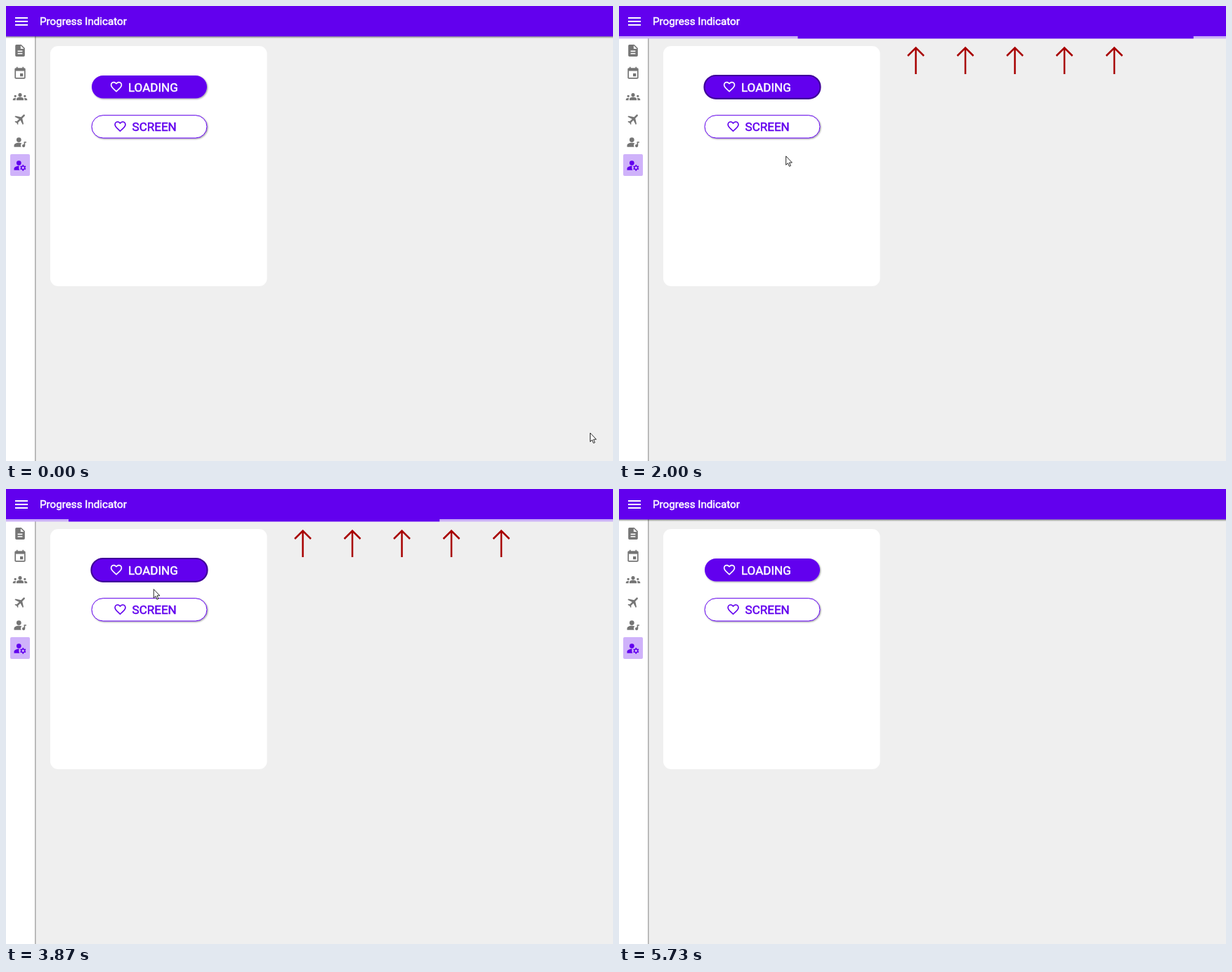
Recreate the animation shown at these times as an HTML page. Size 864x648 px, loop 5.87 s.

```html
<!DOCTYPE html>
<html lang="en">
<head>
<meta charset="utf-8">
<title>Progress Indicator</title>
<style>
  html, body { margin: 0; width: 100%; height: 100%; overflow: hidden; background: #efefef; }
  svg { display: block; width: 864px; height: 648px; }
  text { font-family: Roboto, sans-serif; stroke-width: .5px; }
</style>
</head>
<body>
<svg viewBox="0 0 864 648" xmlns="http://www.w3.org/2000/svg">
  <defs>
    <linearGradient id="down" x2="0" y2="1">
      <stop offset="0" stop-color="#000" stop-opacity=".42"/>
      <stop offset="1" stop-color="#000" stop-opacity="0"/>
    </linearGradient>
    <linearGradient id="right">
      <stop offset="0" stop-color="#999"/>
      <stop offset="1" stop-color="#ddd"/>
    </linearGradient>
    <filter id="shadow" x="-10%" y="-20%" width="120%" height="150%">
      <feDropShadow dx="1" dy="1" stdDeviation=".8" flood-color="#000" flood-opacity=".4"/>
    </filter>
    <path id="heart" d="M16.5 3c-1.74 0-3.41.81-4.5 2.09C10.91 3.81 9.24 3 7.5 3 4.42 3 2 5.42 2 8.5c0 3.78 3.4 6.86 8.55 11.54L12 21.35l1.45-1.32C18.6 15.36 22 12.28 22 8.5 22 5.42 19.58 3 16.5 3zm-4.4 15.55l-.1.1-.1-.1C7.14 14.24 4 11.39 4 8.5 4 6.5 5.5 5 7.5 5c1.54 0 3.04.99 3.57 2.36h1.87C13.46 5.99 14.96 5 16.5 5c2 0 3.5 1.5 3.5 3.5 0 2.89-3.14 5.74-7.9 10.05z"/>
    <path id="redArrow" d="M0 97V59.500M-11.500 71L0 59.500L11.500 71"/>
  </defs>

  <rect width="864" height="648" fill="#efefef"/>
  <rect x="63" y="57" width="308.500" height="342" rx="11" fill="#fff"/>

  <rect width="41" height="648" fill="#fff"/>
  <rect x="41" width="2" height="648" fill="url(#right)"/>
  <rect x="6" y="211" width="28" height="31" rx="2" fill="#cfb2fa"/>
  <g id="menu" fill="#757575" fill-rule="evenodd">
    <path transform="translate(9.800 53.300) scale(.85)" d="M14 2H6c-1.100 0-1.990.9-1.990 2L4 20c0 1.100.89 2 1.990 2H18c1.100 0 2-.9 2-2V8l-6-6zm2 16H8v-2h8v2zm0-4H8v-2h8v2zm-3-5V3.500L18.500 9H13z"/>
    <path transform="translate(9.800 85.800) scale(.85)" d="M17 12h-5v5h5v-5zM16 1v2H8V1H6v2H5c-1.110 0-1.990.9-1.990 2L3 19c0 1.100.89 2 2 2h14c1.100 0 2-.9 2-2V5c0-1.100-.9-2-2-2h-1V1h-2zm3 18H5V8h14v11z"/>
    <path transform="translate(9.800 119) scale(.85)" d="M12 12.750c1.630 0 3.070.39 4.240.9 1.080.48 1.760 1.560 1.760 2.730V18H6v-1.610c0-1.180.68-2.260 1.760-2.730 1.170-.52 2.610-.91 4.240-.91zM4 13a2 2 0 1 0 0-4 2 2 0 0 0 0 4zm1.130 1.100c-.37-.06-.74-.1-1.130-.1-.99 0-1.930.21-2.780.58C.48 14.900 0 15.620 0 16.430V18h4.500v-1.610c0-.83.23-1.610.63-2.290zM20 13a2 2 0 1 0 0-4 2 2 0 0 0 0 4zm4 3.430c0-.81-.48-1.530-1.220-1.850-.85-.37-1.790-.58-2.780-.58-.39 0-.76.04-1.130.1.4.68.63 1.460.63 2.290V18H24v-1.570zM12 6a3 3 0 1 1 0 6 3 3 0 0 1 0-6z"/>
    <path transform="translate(20.500 161) rotate(45) scale(.85) translate(-11.500 -12)" d="M21 16v-2l-8-5V3.500c0-.83-.67-1.500-1.500-1.500S10 2.670 10 3.500V9l-8 5v2l8-2.500V19l-2 1.500V22l3.500-1 3.500 1v-1.500L13 19v-5.500l8 2.500z"/>
    <path transform="translate(9.800 183.800) scale(.85)" d="M10 4a4 4 0 1 1 0 8 4 4 0 0 1 0-8zM2 20v-2.800c0-1.100.6-2.200 1.600-2.700 3.300-1.700 7.700-2 11.200-.8a5 5 0 0 0-.8 6.300zM18.500 11h4v2h-2v5a2.500 2.500 0 1 1-2-2.450z"/>
    <path fill="#6200ee" transform="translate(9.800 216.800) scale(.85)" d="M10 4a4 4 0 1 1 0 8 4 4 0 0 1 0-8zM10.670 13.020C10.450 13.010 10.230 13 10 13c-2.420 0-4.680.67-6.610 1.820-.88.52-1.390 1.500-1.390 2.530V20h9.260c-.79-1.130-1.260-2.510-1.260-4 0-1.070.25-2.070.67-2.980zM20.750 16c0-.22-.03-.42-.06-.63l1.140-1.010-1-1.730-1.450.49c-.32-.27-.68-.48-1.080-.63L18 11h-2l-.3 1.490c-.4.15-.76.36-1.080.63l-1.450-.49-1 1.730 1.140 1.010c-.03.21-.06.41-.06.63s.03.42.06.63l-1.140 1.010 1 1.730 1.450-.49c.32.27.68.48 1.080.63L16 21h2l.3-1.490c.4-.15.76-.36 1.080-.63l1.450.49 1-1.730-1.140-1.010c.03-.21.06-.41.06-.63zM17 18a2 2 0 1 1 0-4 2 2 0 0 1 0 4z"/>
  </g>

  <rect y="43" width="864" height="3.500" fill="url(#down)"/>
  <rect width="864" height="43.300" fill="#6200ee"/>
  <path transform="translate(10 10)" fill="#fff" d="M3 16h18v2H3zM3 11h18v2H3zM3 6h18v2H3z"/>
  <text x="48" y="27.300" font-size="15.200" fill="#fff" stroke="#fff">Progress Indicator</text>

  <g id="loading">
    <rect id="face" x="122" y="99" width="164" height="32.500" rx="16.250" fill="#6200ee"/>
    <use href="#heart" transform="translate(147.200 105.300) scale(.82)" fill="#fff"/>
    <text x="174" y="121.700" font-size="17" fill="#fff" stroke="#fff">LOADING</text>
  </g>
  <rect id="ring" y="99" x="121.500" width="165" height="32.800" rx="16.400" fill="none"/>

  <rect x="122" y="155.700" width="164" height="32.300" rx="16.150" fill="#fff" stroke="#6200ee" filter="url(#shadow)"/>
  <use href="#heart" transform="translate(152.700 161.700) scale(.82)" fill="#6200ee"/>
  <text x="179.600" y="177.900" font-size="17" fill="#6200ee" stroke="#6200ee">SCREEN</text>

  <g id="progress">
    <rect y="43" width="864" height="3.400" fill="#cbb0f7"/>
    <rect id="first" y="43" height="3.400" fill="#6200ee"/>
    <rect id="second" y="43" height="3.400" fill="#6200ee"/>
    <g fill="none" stroke="#a80000" stroke-width="2.500">
      <use href="#redArrow" x="422.500"/>
      <use href="#redArrow" x="493"/>
      <use href="#redArrow" x="563.500"/>
      <use href="#redArrow" x="634"/>
      <use href="#redArrow" x="705"/>
    </g>
  </g>

  <g id="cursor" fill="#fff" stroke="#111" stroke-linejoin="round">
    <path id="pointer" stroke-width=".9" d="M.5 0V12.500L3.300 9.900L5.200 14.500L7.200 13.700L5.300 9.200H9.200Z"/>
    <path id="hand" stroke-width="1" d="M-1.600 11.500V1.300C-1.600-.4 1.400-.4 1.400 1.300V7C1.600 5.600 4 5.800 4 7.300C4.200 6.300 6.400 6.400 6.500 7.900C7 7.200 8.800 7.500 8.800 9V13C8.800 15.500 7.400 16.500 7.200 19H-.6C-.9 16.500-4.800 12.600-5 10.600C-5 9-3 9-1.600 11.500Z"/>
  </g>
</svg>
<script>
const LOOP = 5870, FPS = 15, WIDTH = 864;
const CYCLE = 2000, CYCLE_START = 1470;
const $ = id => document.getElementById(id);
const clamp = v => Math.min(1, Math.max(0, v));
const within = (t, from, to) => t >= from && t < to;
const show = (id, on) => $(id).setAttribute('display', on ? 'inline' : 'none');

// [time, x, y] of the cursor's hot spot
const route = [
  [0, 831, 608], [600, 229, 127], [870, 229, 122], [1670, 229, 122],
  [2200, 241, 257], [2930, 241, 257], [3400, 228, 245], [3470, 226, 239],
  [4070, 204, 109], [4670, 204, 109], [5270, 29, 650]
];

function cursorAt(t) {
  const next = route.findIndex(stop => stop[0] > t);
  if (next < 0) return route[route.length - 1].slice(1);
  const [t0, x0, y0] = route[next - 1], [t1, x1, y1] = route[next];
  const u = (t - t0) / (t1 - t0), k = u * u * (3 - 2 * u);
  return [x0 + (x1 - x0) * k, y0 + (y1 - y0) * k];
}

// Head and tail each cross the track at constant speed.
function setBar(id, ms, headFrom, headTo, tailFrom, tailTo) {
  const head = WIDTH * clamp((ms - headFrom) / (headTo - headFrom));
  const tail = WIDTH * clamp((ms - tailFrom) / (tailTo - tailFrom));
  $(id).setAttribute('x', tail);
  $(id).setAttribute('width', Math.max(0, head - tail));
}

function render(t) {
  const [x, y] = cursorAt(t);
  const hover = within(x, 122, 286) && within(y, 99, 131.5);
  const focus = within(t, 1130, 5730);
  const running = within(t, 1400, 4600);

  $('cursor').setAttribute('transform', `translate(${x} ${y})`);
  show('cursor', t < 5270);
  show('hand', hover);
  show('pointer', !hover);

  $('loading').style.filter = hover ? 'brightness(.8)' : 'none';
  $('face').setAttribute('filter', focus && !hover ? 'none' : 'url(#shadow)');
  show('ring', focus);
  $('ring').setAttribute('stroke', hover ? '#7d6f96' : '#3f0099');
  $('ring').setAttribute('stroke-width', hover ? 1.2 : 2.2);

  show('progress', running);
  const ms = Math.max(0, t - CYCLE_START) % CYCLE;
  setBar('first', ms, 0, 560, 330, 1009);
  setBar('second', ms, 870, 1483, 1330, 2006);
}

const start = performance.now();
function tick() {
  const elapsed = (performance.now() - start) % LOOP;
  const step = Math.floor((elapsed + 5) * FPS / 1000);
  render(Math.round(step * 100 / FPS) * 10);
  requestAnimationFrame(tick);
}
tick();
</script>
</body>
</html>
```
